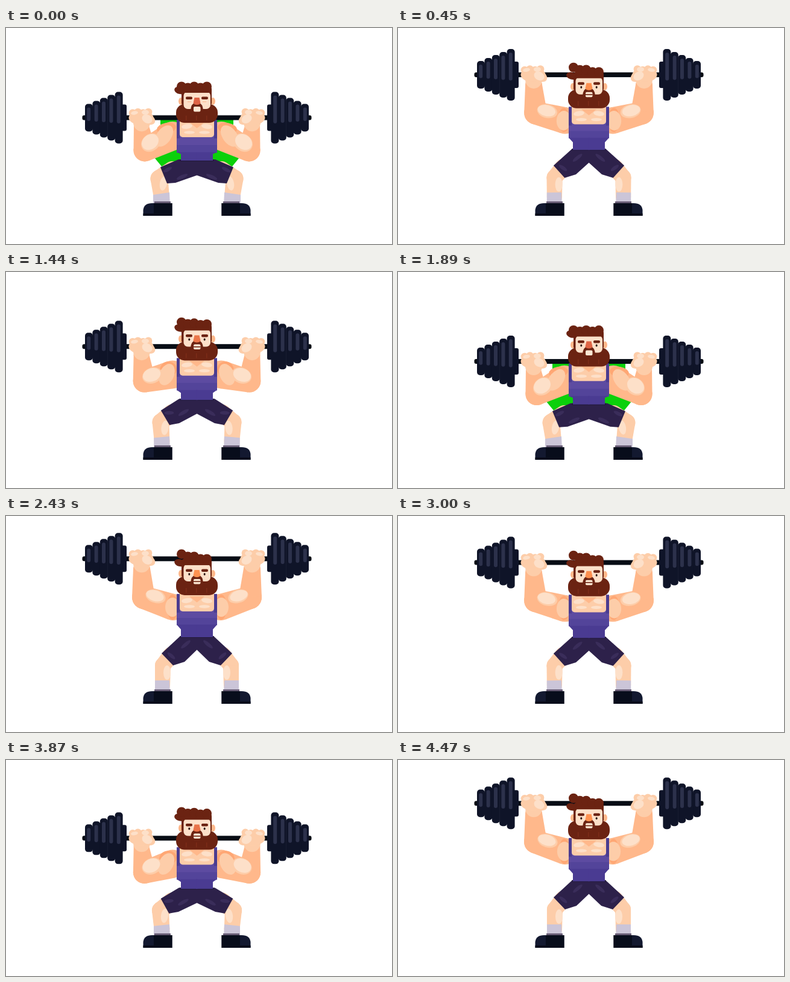
These frames come from a looping animation (640x360 px, 4500 ms). An HTML page:

```html
<!DOCTYPE html>
<html lang="en">
<head>
<meta charset="utf-8">
<title>Barbell press</title>
<style>
html, body { margin: 0; width: 100%; height: 100%; overflow: hidden; background: #fff; }
svg { display: block; width: 100vw; height: 100vh; }
</style>
</head>
<body>
<svg id="stage" viewBox="0 0 640 360"></svg>
<script>
const LOOP = 4500, REP = 1800, STEP = 30, AXIS = 316.5;
const RISE = 510, DROP = 1090, LAND = 1650;   // phases of one repetition, ms
const LOW = 149.5, HIGH = 69.5;               // bar height
const stage = document.getElementById('stage');

const C = {
  plate: '#0f1428', shine: '#2c314b', bar: '#080d15',
  skin: '#fdcda9', light: '#fde0c9', tan: '#ffb88b', deep: '#ffa774',
  hair: '#6b2312', lock: '#7d2c18',
  top1: '#5d4ba1', top2: '#53449a', top3: '#4a3b92', strap: '#4b3c90',
  shorts: '#2d214a', fold: '#3a2d5a', waist: '#211838',
  sock: '#cbc5d8', cuff: '#685d75', shoe: '#080d1b', shoe2: '#131930',
  green: '#0bd00b'
};

const mix = (a, b, k) => a + (b - a) * k;
const smooth = u => u * u * (3 - 2 * u);
const n = v => +v.toFixed(2);

const path = (d, fill) => `<path d="${d}" fill="${fill}"/>`;
const rect = (x, y, w, h, fill, r = 0) =>
  `<rect x="${n(x)}" y="${n(y)}" width="${n(w)}" height="${n(h)}" rx="${r}" fill="${fill}"/>`;
const oval = (x, y, rx, ry, fill, a = 0) =>
  `<ellipse rx="${n(rx)}" ry="${n(ry)}" fill="${fill}" transform="translate(${n(x)} ${n(y)}) rotate(${n(a)})"/>`;
const poly = (pts, fill) => path('M' + pts.map(p => n(p[0]) + ' ' + n(p[1])).join('L') + 'Z', fill);
const shift = (y, s) => `<g transform="translate(0 ${n(y)})">${s}</g>`;
const both = s => s + `<g transform="matrix(-1 0 0 1 ${2 * AXIS} 0)">${s}</g>`;

// A joint is [x, y, radius]; a bone is the hull of two joints
const joint = (bent, straight, k) => bent.map((v, i) => mix(v, straight[i], k));

function bone([x1, y1, r1], [x2, y2, r2], fill) {
  const a = Math.atan2(y2 - y1, x2 - x1);
  const b = Math.acos((r1 - r2) / Math.hypot(x2 - x1, y2 - y1));
  const rim = (x, y, r, t) => [x + r * Math.cos(t), y + r * Math.sin(t)];
  return oval(x1, y1, r1, r1, fill) + oval(x2, y2, r2, r2, fill)
    + poly([rim(x1, y1, r1, a + b), rim(x2, y2, r2, a + b),
            rim(x2, y2, r2, a - b), rim(x1, y1, r1, a - b)], fill);
}

function barAt(ms) {
  if (ms < RISE) return mix(LOW, HIGH, smooth(Math.pow(ms / RISE, 1.8)));
  if (ms < DROP) return HIGH + 3 * Math.sin(Math.PI * (ms - RISE) / (DROP - RISE));
  return mix(HIGH, LOW, smooth(Math.min(1, (ms - DROP) / (LAND - DROP))));
}

function weights() {
  let s = rect(126.5, -4, 8, 8, C.bar, 3) + rect(189, -22, 11, 44, C.plate, 3);
  for (let i = 0; i < 5; i++) {
    const x = 131 + i * 12.4, h = 23 + i * 5;
    s += rect(x, -h, 13, h * 2, C.plate, 5);
    s += rect(x + 3.2, 6 - h, 6, h * 1.2 - 5, C.shine, 3);
  }
  return s;
}

function arm(p, bar) {
  const shoulder = joint([276, 180, 24], [277, 152, 22], p);
  const elbow = joint([230, 204, 18.5], [228, 136, 19], p);
  const wrist = [mix(224, 225, p), bar + mix(12, 17, p), mix(12, 14, p)];
  const [sx, sy] = shoulder, [ex, ey] = elbow;
  return bone(shoulder, elbow, C.tan) + bone(elbow, wrist, C.tan)
    + oval(sx - mix(10, 1, p), sy - mix(13, 0, p), mix(16, 9, p), mix(9, 21, p), C.deep, mix(-10, 0, p))
    + oval(sx - mix(14, 1, p), sy, 12, mix(20, 16, p), C.skin, mix(35, 0, p))
    + oval(ex + mix(10, 20, p), ey - mix(13, 2, p), 17, mix(14, 11, p), C.skin, mix(-38, 17, p))
    + oval(ex + mix(9, 19, p), ey - mix(14, 3, p), 15, mix(12, 9, p), C.light, mix(-38, 17, p));
}

function hand() {
  let s = oval(225, 8, 14, 15, C.skin) + oval(224, 0, 20.5, 12, C.skin);
  for (let i = 0; i < 4; i++) s += oval(210 + i * 8.7, -8 - i % 2 * 1.5, 6.3, 6.3, C.skin);
  return s + oval(237, 3, 11, 8, C.skin, 30) + oval(234, 2, 9, 7, C.light, 30)
    + oval(231, -9, 6, 4, C.light) + oval(213, -8, 6, 3, C.light, -10);
}

function leg(q) {
  const hip = joint([276, 237, 15], [274, 232, 14], q);
  const knee = joint([254, 251, 14.5], [260, 249, 13], q);
  const ankle = joint([258, 282, 13], [259.5, 282, 12.5], q);
  const left = mix(244, 247, q);
  return bone(hip, knee, C.skin) + bone(knee, ankle, C.skin)
    + oval(knee[0] + 7, mix(259, 261, q), 6, 12, C.light, mix(10, 0, q))
    + poly([[left, mix(278, 274, q)], [271, 274], [272, 296], [left, 296]], C.sock)
    + rect(246, 289, 27, 4, C.cuff)
    + path('M227.5 313V303Q229 292 242 292H275.5V313Z', C.shoe2)
    + path('M245 292H275.5V313H245ZM227.5 309H275.5V313H227.5Z', C.shoe);
}

function shorts(q) {
  const top = mix(219, 200, q);
  const half = [[mix(286, 289, q), top], [mix(256, 258, q), mix(232, 229, q)],
    [mix(267, 277, q), mix(259, 249, q)], [mix(281, 296, q), mix(258, 243, q)],
    [AXIS, mix(245.5, 223, q)]];
  const flip = half.map(([x, y]) => [2 * AXIS - x, y]).reverse();
  return poly(half.concat(flip), C.shorts)
    + rect(288.5, top, 56, 3, C.waist)
    + both(oval(mix(292, 298, q), mix(248, 214, q), 10, 3, C.fold, mix(-24, -40, q))
      + oval(mix(268, 274, q), mix(236, 233, q), 8, 3, C.fold, mix(-28, 40, q)));
}

function torso(q) {
  const top = mix(153, 130, q), neck = mix(182, 159, q), band = mix(195, 170, q);
  const waist = mix(207, 181, q), end = mix(221, 202, q), taper = waist + mix(3, 8, q);
  return rect(283, top, 67, waist - top + 1, C.top1)
    + rect(283, band, 67, waist - band, C.top2)
    + both(poly([[283, waist], [AXIS + 1, waist], [AXIS + 1, end], [290, end], [290, taper]], C.top3)
      + rect(283, top, 5, neck - top + 2, C.strap))
    + rect(288, top - 6, 57, neck - top + 6, C.skin, 5)
    + poly([[304, top + 4], [AXIS, top + 14], [329, top + 4]], C.tan)
    + both(oval(304, neck - 8, 9, 2.6, C.light) + oval(300, neck - 18, 9, 4, C.light, -8));
}

function hair(q) {
  let s = rect(291, 97, 50, 33, C.hair, 5) + oval(288, 104, 9, 6, C.hair, 15);
  for (let i = 0; i < 5; i++) {
    s += oval(291 + i * 10.5, 97.5 + i % 2 * 2 - q * (8 - 2 * i), 8, 8, C.hair);
  }
  return s;
}

function head(q, closed) {
  const nose = `rgb(${n(mix(222, 255, q))},${n(mix(100, 146, q))},${n(mix(70, 80, q))})`;
  const lid = closed ? rect(301, 122.5, 6, 1, C.tan) : oval(303.8, 123, 1.5, 2, '#2a1512');
  let s = both(oval(290, 122, 4, 6, C.tan)) + hair(q)
    + rect(282, 127, 69, 31, C.hair, 14)
    + rect(294.5, 106, 44.5, 29, C.light, 7)
    + rect(294.5, 104, 44.5, 4, C.hair)
    + both(rect(298, 114.5, 11, 4.5, C.hair, 2) + lid)
    + path('M306 137Q307 126 313 125H320Q326 126 327 137V144H306Z', C.hair)
    + path('M312.5 116H320.5L322.5 125Q321 128 316.5 128Q312 128 310.5 125Z', nose)
    + rect(311, 131, 11.5, 8.5, '#fde6d2', 2);
  if (q > 0.2) s += rect(311, 134.5, 11.5, 1.6, C.hair);
  for (let i = 0; i < 3; i++) s += rect(298 + i * 17, 146, 1.5, 8, C.lock);
  return shift(-26 * q, s);
}

// Backdrop left in the pockets that the bent arms enclose
function pockets(bar) {
  if (bar < 142) return '';
  return both(poly([[246, 216], [262, 203], [287, 198], [293, 222], [259, 232]], C.green)
    + rect(256, 151, 30, 10, C.green));
}

function render(time) {
  const t = Math.floor((time % LOOP) / STEP) * STEP;
  const ms = t % REP, bar = barAt(ms);
  const p = (LOW - bar) / (LOW - HIGH - 2);   // arms
  const q = Math.pow(p, 0.8);                 // body follows a little ahead
  const closed = ms > 1500 || ms < 60;
  stage.innerHTML = rect(0, 0, 640, 360, '#fff')
    + pockets(bar)
    + rect(193, bar - 4, 247, 8, C.bar)
    + shift(bar, both(weights()))
    + both(arm(p, bar) + leg(q))
    + shorts(q) + torso(q) + head(q, closed)
    + shift(bar, both(hand()));
}

const start = performance.now();
function tick() {
  render(performance.now() - start);
  requestAnimationFrame(tick);
}
tick();
</script>
</body>
</html>
```
